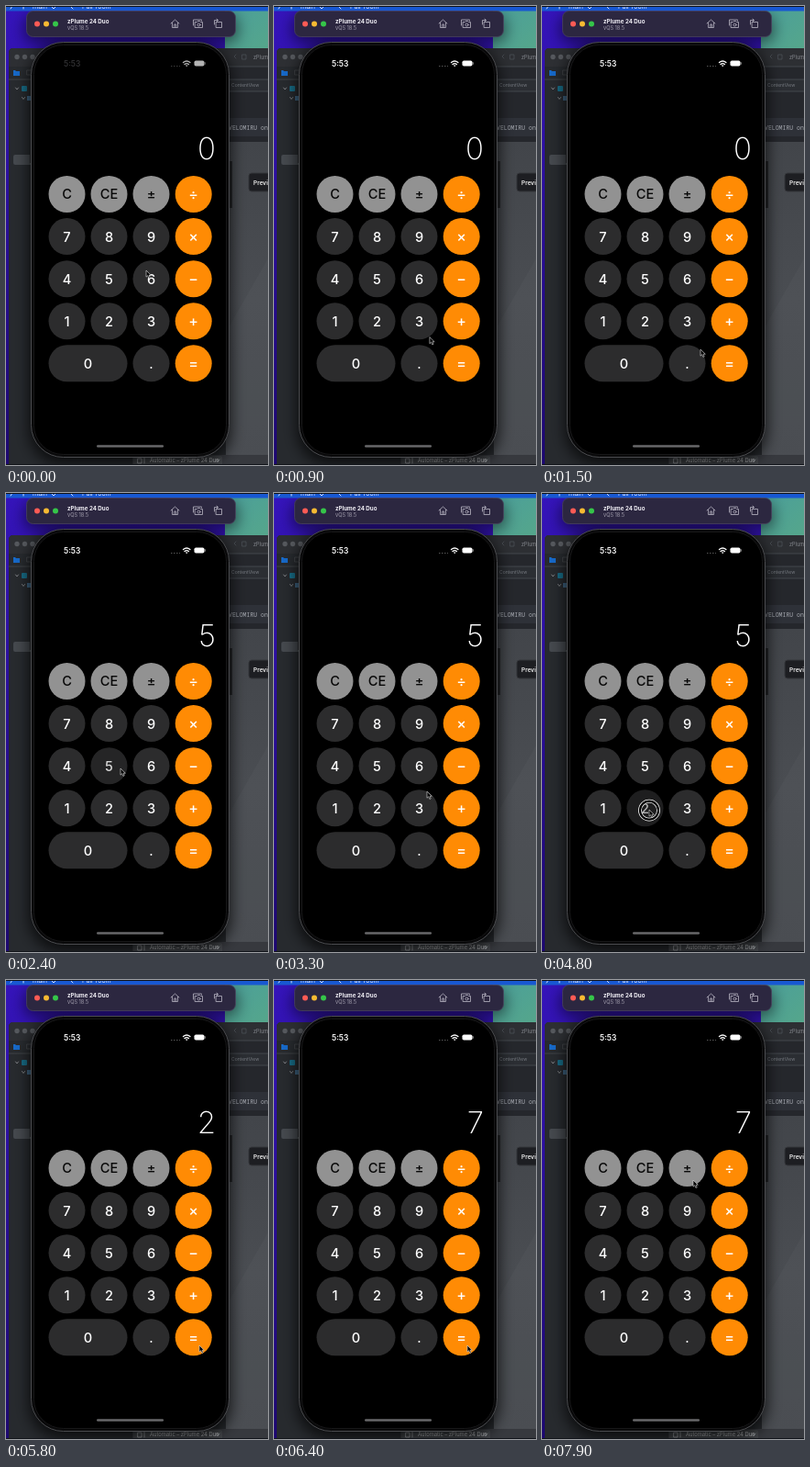
These frames come from a looping animation (286 px wide and 500 px high, 8000 ms). An HTML page:

```html
<!DOCTYPE html>
<html lang="en">
<head>
<meta charset="utf-8">
<title>Calculator demo</title>
<style>
  html, body { margin: 0; width: 100%; height: 100%; overflow: hidden; background: #000; }
  svg { display: block; width: 100vw; height: 100vh; font-family: Inter, "Open Sans", sans-serif; }
  .mono { font-family: "Noto Sans Mono", "DejaVu Sans Mono", monospace; }
  .line { fill: none; stroke-linecap: round; stroke-linejoin: round; }
</style>
</head>
<body>
<svg viewBox="0 0 286 500">
  <defs>
    <linearGradient id="wall" x2="0" y2="1">
      <stop stop-color="#3514bb"/><stop offset="1" stop-color="#1d0870"/>
    </linearGradient>
    <linearGradient id="teal" x2="1" y2="1">
      <stop stop-color="#4b9f9a"/><stop offset="1" stop-color="#55a68b"/>
    </linearGradient>
    <linearGradient id="canvas" x2="0" y2="1">
      <stop stop-color="#42454a"/><stop offset=".5" stop-color="#4a4d52"/><stop offset="1" stop-color="#45484d"/>
    </linearGradient>
    <filter id="blur" x="-50%" y="-100%" width="200%" height="300%"><feGaussianBlur stdDeviation="8"/></filter>
  </defs>

  <!-- desktop -->
  <rect width="286" height="500" fill="url(#wall)"/>
  <path d="M239 5H286V46H239Z" fill="url(#teal)"/>

  <!-- editor window -->
  <path d="M3 500V51q0-5 5-5H286V500Z" fill="#272a2e"/>
  <path d="M3 66V51q0-5 5-5H286V66Z" fill="#2d2f33"/>
  <g fill="#55585d"><circle cx="12" cy="55.500" r="2.700"/><circle cx="20.500" cy="55.500" r="2.700"/><circle cx="29" cy="55.500" r="2.700"/></g>
  <path d="M8 70h2l1 1h4v5H8Z" fill="#1769c8"/>
  <path class="line" d="M23 70h5v5h-5Z M3 80H28" stroke="#4b4e52" stroke-width=".7"/>
  <path class="line" d="M10.500 89l1.500 2 1.500-2M17.500 99.500l1.500 2 1.500-2" stroke="#8c8f94" stroke-width=".8"/>
  <rect x="17" y="87" width="6" height="6" rx="1" fill="#176b85"/>
  <path d="M23 98h4v5h-4Z" fill="#3d6380"/>
  <rect x="8" y="162" width="25" height="11" rx="2" fill="#45494e"/>
  <path d="M240 66H286V148H240Z" fill="#25272c"/>
  <path d="M240 80H286V93H240Z" fill="#2b2e33"/>
  <path d="M240 122H286V142H240Z" fill="#2e3138"/>
  <path class="line" d="M251 53l-2 2 2 2M258 53h4v5h-4ZM240 66H286M240 80H286M240 93H286" stroke="#50545b" stroke-width=".7"/>
  <text x="270" y="57.500" font-size="5.500" fill="#85888e">zPlume</text>
  <text x="246" y="88" font-size="5" fill="#777b82">ContentView</text>
  <text class="mono" x="243" y="135" font-size="6.500" fill="#a3a6ad">VELOMIRU on</text>
  <path d="M240 148H286V490H240Z" fill="url(#canvas)"/>
  <path d="M240 355L286 275V490H240Z" fill="#5a5c61" opacity=".25"/>
  <path d="M138 489H286V500H138Z" fill="#37393e"/>
  <rect x="139" y="490" width="97" height="12" rx="2" fill="#43464a"/>
  <path class="line" d="M144 493h4v5h-4ZM151 492v6M230 494l1.500 2 1.500-2" stroke="#a4a7ab" stroke-width=".8"/>
  <text x="157" y="497" font-size="5.800" fill="#c0c2c5">Automatic – zPlume 24 Duo</text>

  <!-- soft shadows -->
  <g filter="url(#blur)">
    <rect x="25" y="43" width="221" height="456" rx="36" opacity=".7"/>
    <rect x="20" y="10" width="233" height="30" rx="8" opacity=".5"/>
  </g>
  <rect x="265" y="182" width="35" height="20" rx="3" fill="#1d1e22" stroke="#35373b"/>
  <text x="270" y="194.500" font-size="6.500" font-weight="600" fill="#eee">Preview</text>

  <!-- menu bar -->
  <path d="M0 0H286V5.500H0Z" fill="#1858d2"/>
  <g fill="#e4edff" font-size="7">
    <text x="29" y="2.500">main</text><text x="83" y="2.500">Pair room</text>
  </g>
  <path class="line" d="M5 3l2-3M19 0v3M50 1l2 2 2-2M70 0l3 3" stroke="#cfe0ff"/>
  <path d="M0 0H286V1H0ZM0 499H286V500H0Z" fill="#101319"/>

  <!-- simulator title bar -->
  <rect x="22.500" y="5.500" width="228" height="28" rx="7" fill="#2c2740" stroke="#48425c" stroke-width=".8"/>
  <circle cx="34" cy="19.500" r="3" fill="#ff5b55"/>
  <circle cx="44" cy="19.500" r="3" fill="#f8ba32"/>
  <circle cx="54" cy="19.500" r="3" fill="#35c649"/>
  <text x="67" y="19" font-size="6.200" font-weight="700" fill="#f3f1f7">zPlume 24 Duo</text>
  <text x="67" y="26" font-size="5.600" fill="#a19dac">vQS 18.5</text>
  <g class="line" stroke="#aaa6b5" stroke-width=".9">
    <path d="M180 19l4.500-4 4.500 4M181.500 18.500v5h6v-5M183.700 23v-3h1.800v3"/>
    <path d="M204.500 21v-6h9v1M206.500 17.500h2l1-1h2l1 1h2v6h-8Z"/><circle cx="210.500" cy="20.500" r="1.500"/>
    <path d="M229.500 17.500h6v6h-6ZM227.500 20v-4.500h4M230 14l1.500 1.500L230 17"/>
  </g>

  <!-- phone -->
  <path d="M26 118h3v15h-3ZM26 146h3v25h-3ZM26 178h3v25h-3ZM243 169h4v51h-4Z" fill="#17181a"/>
  <rect x="27.500" y="39.500" width="216" height="452" rx="35" fill="#09090a" stroke="#4a4b4e"/>
  <rect x="30.500" y="42.500" width="210" height="446" rx="32" fill="#000" stroke="#161617"/>
  <text id="clock" x="63" y="66" font-size="8.400" font-weight="600">5:53</text>
  <g id="status">
    <path d="M180 65h1.500v1H180ZM183 65h1.500v1H183ZM186 65h1.500v1H186ZM189 65h1v1H189Z" fill="#555"/>
    <path class="line" d="M193.500 61.500q3.700-3 7.400 0M195 63.500q2.200-1.800 4.400 0" stroke="#fff" stroke-width="1.400"/>
    <path d="M195.800 64.500h2.800l-1.400 1.700Z" fill="#fff"/>
    <rect x="205.500" y="59.500" width="11" height="6" rx="1.800" fill="#fff"/>
    <path d="M217.200 61.300v2.400" stroke="#aaa"/>
  </g>
  <text id="display" x="229" y="167.300" text-anchor="end" font-size="33" font-weight="250" fill="#fff"></text>
  <g id="keys" text-anchor="middle"></g>
  <rect x="99" y="478.300" width="73" height="2.500" rx="1.250" fill="#68686a"/>

  <!-- pointer -->
  <g id="ring" class="line">
    <circle r="10" stroke="#fff" stroke-width="3.800"/><circle r="10" stroke="#000" stroke-width="2.200"/>
  </g>
  <path id="cursor" d="M0 0V7.200L1.700 5.700L2.900 8.400L4.200 7.800L3.100 5.200H5.300Z" fill="#080808" stroke="#ddd" stroke-width=".6"/>
</svg>
<script>
const LOOP = 8000;
const $ = id => document.getElementById(id);

function add(parent, tag, attrs, text = "") {
  const node = document.createElementNS("http://www.w3.org/2000/svg", tag);
  for (const name in attrs) node.setAttribute(name, attrs[name]);
  node.textContent = text;
  parent.append(node);
  return node;
}

const columns = [66.5, 112.5, 158.5, 204.7];
const palette = {
  grey: ["#929292", "#080808"],
  dark: ["#2c2c2d", "#fff"],
  orange: ["#ff8b04", "#fff"]
};
const keys = {};

function addKey(label, x, y, halfWidth, kind) {
  const [fill, color] = palette[kind];
  const size = kind === "orange" ? 16 : 14.6;
  const key = keys[label] = add($("keys"), "g", {});
  add(key, "rect", { x: x - halfWidth, y: y - 20, width: 2 * halfWidth, height: 40, rx: 20, fill });
  add(key, "text", { x, y: y + size * 0.37, "font-size": size, "font-weight": 500, fill: color }, label);
}

[["C", "CE", "±", "÷"], ["7", "8", "9", "×"], ["4", "5", "6", "−"], ["1", "2", "3", "+"]].forEach((row, r) =>
  row.forEach((label, c) =>
    addKey(label, columns[c], 205 + 46.1 * r, 20, c === 3 ? "orange" : r ? "dark" : "grey")));
addKey("0", 89.5, 389.3, 43, "dark");
addKey(".", columns[2], 389.3, 20, "dark");
addKey("=", columns[3], 389.3, 20, "orange");

// Pointer stops: time, x, y
const stops = [
  [0, 153, 288], [300, 153, 288], [1100, 173, 374], [1600, 173, 374],
  [2100, 125, 300], [2800, 125, 300], [3700, 197, 343], [4200, 197, 343],
  [4800, 117, 345], [5100, 117, 345], [5700, 211, 398], [6800, 211, 398],
  [7800, 165, 218], [8000, 165, 218]
];
// Taps: key, start, end, display afterwards
const taps = [
  ["5", 2100, 2300, "5"], ["+", 3900, 4100, "5"],
  ["2", 4800, 5000, "2"], ["=", 6000, 6200, "7"]
];
const PRESSED_OPACITY = 0.7, RELEASE = 200;

function pointerAt(t) {
  const i = stops.findIndex(stop => stop[0] > t);
  const [t0, x0, y0] = stops[i - 1], [t1, x1, y1] = stops[i];
  const p = (t - t0) / (t1 - t0), e = p * p * (3 - 2 * p);
  return [x0 + (x1 - x0) * e, y0 + (y1 - y0) * e];
}

function draw(now) {
  const t = Math.floor(now % LOOP / 100) * 100;
  const [x, y] = pointerAt(t);
  let value = "0", tapping = false;
  for (const [label, start, end, result] of taps) {
    const released = t < start ? 1 : Math.min(1, Math.max(0, (t - end) / RELEASE));
    keys[label].setAttribute("opacity", PRESSED_OPACITY + (1 - PRESSED_OPACITY) * released);
    tapping ||= t >= start && t < end;
    if (t >= end) value = result;
  }
  $("display").textContent = value;
  $("clock").setAttribute("fill", t < 300 ? "#303032" : "#fff");
  $("status").setAttribute("opacity", t < 300 ? 0.7 : 1);
  $("cursor").setAttribute("transform", `translate(${x} ${y})`);
  $("ring").setAttribute("transform", `translate(${x} ${y + 0.7})`);
  $("ring").setAttribute("visibility", tapping ? "visible" : "hidden");
  requestAnimationFrame(draw);
}
requestAnimationFrame(draw);
</script>
</body>
</html>
```
